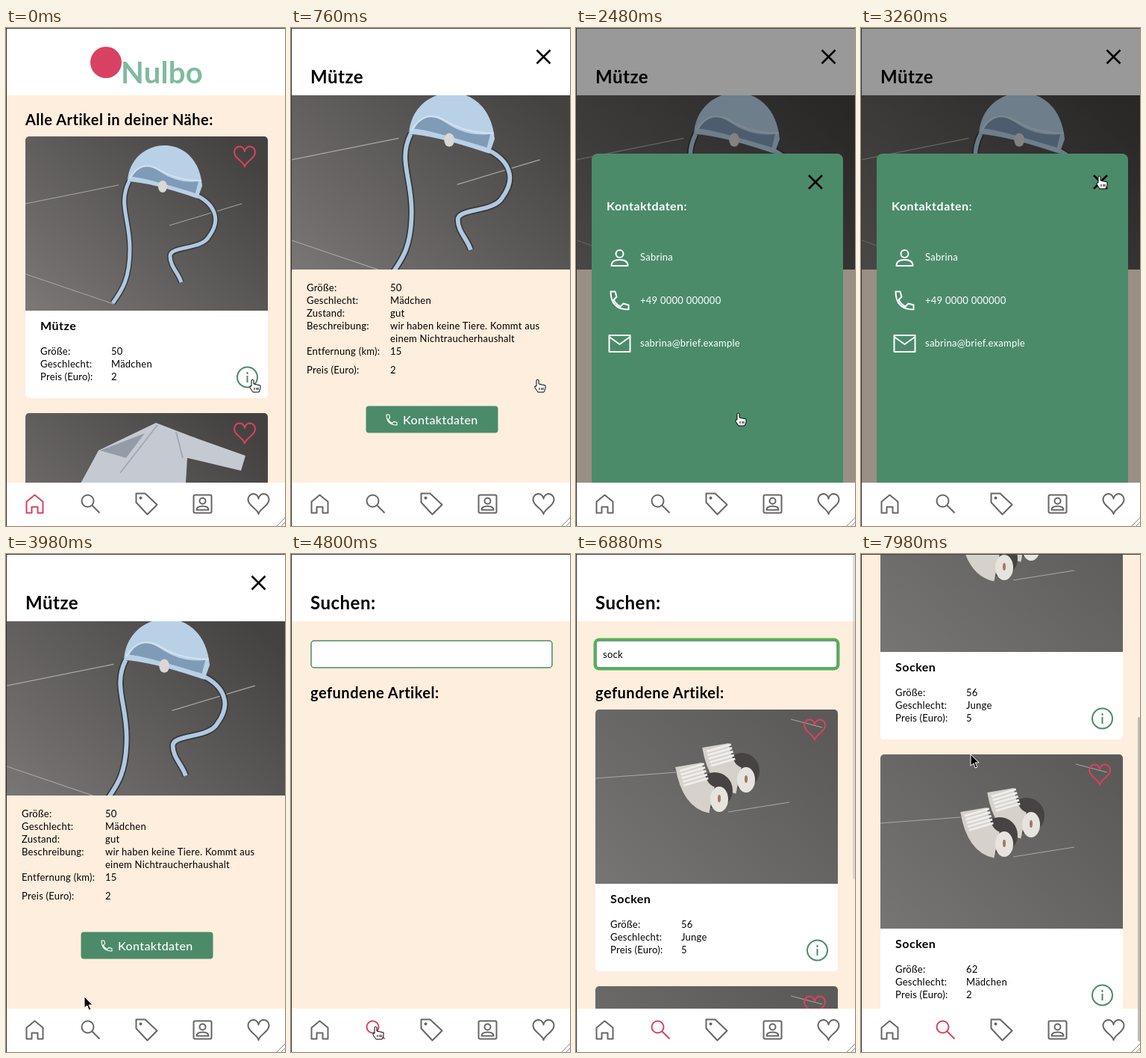
An HTML page for the animation above (8000 ms loop, 374x666 px).

```html
<!DOCTYPE html>
<html lang="de">
<head>
<meta charset="utf-8">
<title>Kinderartikel</title>
<style>
  html, body { margin: 0; width: 100%; height: 100%; overflow: hidden; background: #fff; }
  svg { display: block; }
  text { font: 13px Lato, "Open Sans", sans-serif; letter-spacing: .25px; }
  .h1, .h2, .h3 { font-weight: 700; letter-spacing: .5px; }
  .h1 { font-size: 24px; }
  .h2 { font-size: 20px; }
  .h3 { font-size: 16px; }
  .button { font-size: 16px; font-weight: 500; letter-spacing: .4px; }
  .brand { font-size: 40px; font-weight: 700; }
  .print { font-size: 6px; }
  .line { fill: none; stroke: #666; stroke-width: 2; stroke-linejoin: round; }
  .active { stroke: #d94162; }
  .green { stroke: #4b8b69; }
  .white { stroke: #fff; }
  .black { stroke: #000; stroke-width: 2.5; }
</style>
</head>
<body>
<svg id="stage" width="374" height="666" viewBox="0 0 374 666"></svg>
<script>
const LOOP = 8000, WIDTH = 374, HEIGHT = 666, HEADER = 90, NAV = 608;
const MARGIN = 26, CARD_STEP = 370, ROW = 17;
const PEACH = '#feeedd', GREEN = '#4b8b69', PINK = '#d94162';
const stage = document.getElementById('stage');

const text = (x, y, s, cls = '', fill = '#000') => `<text x="${x}" y="${y}" class="${cls}" fill="${fill}">${s}</text>`;
const rect = (x, y, w, h, fill, extra = '') => `<rect x="${x}" y="${y}" width="${w}" height="${h}" fill="${fill}" ${extra}/>`;
const path = (d, fill, extra = '') => `<path d="${d}" fill="${fill}" ${extra}/>`;
const stroke = (d, color, width = 1, extra = '') => path(d, 'none', `stroke="${color}" stroke-width="${width}" ${extra}`);
const ellipse = (x, y, rx, ry, fill) => `<ellipse cx="${x}" cy="${y}" rx="${rx}" ry="${ry}" fill="${fill}"/>`;
const at = (x, y, content) => `<g transform="translate(${x} ${y})">${content}</g>`;
const group = (id, content) => `<g id="${id}">${content}</g>`;
const icon = (name, x, y, cls = '', scale = 1) =>
  `<g class="line ${cls}" transform="translate(${x} ${y}) scale(${scale})">${icons[name]}</g>`;

function heartOutline(size) {
  const points = Array.from({ length: 48 }, (_, i) => {
    const a = i / 48 * 2 * Math.PI;
    const y = 13 * Math.cos(a) - 5 * Math.cos(2 * a) - 2 * Math.cos(3 * a) - Math.cos(4 * a);
    return [size * Math.sin(a) ** 3, -(y + 2.5) * size / 15];
  });
  return `<polygon points="${points.join(' ')}"/>`;
}

const icons = {
  home: '<path d="M-11-3L0-12 11-3V12H4V4H-4V12H-11Z"/>',
  search: '<circle cx="-4" cy="-4" r="8"/><path d="M2 2L12 12"/>',
  tag: '<path d="M-14-14H-2L14 1 1 14-14-2Z"/><circle cx="-8" cy="-8" r="1"/>',
  account: '<rect x="-12" y="-12" width="24" height="24" rx="2"/><circle cy="-4" r="4"/><path d="M-8 8Q-8 3 0 3T8 8Z"/>',
  heart: heartOutline(14),
  info: '<circle r="13.5"/><path d="M0-2V7M0-7V-4"/>',
  close: '<path d="M-9-9L9 9M9-9L-9 9"/>',
  person: '<circle cy="-5" r="5"/><path d="M-11 11Q-11 3 0 3T11 11Z"/>',
  phone: '<path d="M-12-12H-6L-4-5-8-1Q-5 5 1 8L5 4 12 6V12Q-12 12-12-12Z"/>',
  mail: '<path d="M-14-11H14V11H-14ZM-14-9L0 1 14-9"/>'
};

// Photos are drawn in a 325 x 233 box on a stone table.
const table = (shade, scratches) => rect(0, 0, 325, 233, `url(#${shade})`) + stroke(scratches, '#aaa8a6');
const ribbon = d => stroke(d, '#38383a', 8) + stroke(d, '#b0c9e0', 5);
const sock = ellipse(160, 108, 24, 24, '#464342') +
  stroke('M125 74Q132 116 156 121', '#d6d1cb', 36) +
  stroke('M129 76L136 100', '#efeeec', 34, 'stroke-dasharray="3 2"') +
  ellipse(166, 120, 12, 17, '#e7e3de') + ellipse(166, 119, 2, 5, '#a17766');

const photos = {
  hat: table('dark', 'M0 90L125 65M0 184L118 224M193 119L290 90') +
    ribbon('M139 60C124 90 140 110 140 150S130 205 117 223') +
    ribbon('M230 79C252 90 264 110 246 134 236 152 194 146 194 160S205 182 209 195') +
    path('M137 60C140 0 230-10 237 66L231 83Q170 62 137 60Z', '#b9d1e7') +
    path('M143 54Q155 30 180 47T232 60L228 76Q160 55 143 54Z', '#809bb7') +
    stroke('M140 56Q155 30 180 45T236 59', '#d2e1ef', 2) +
    ellipse(184, 67, 6, 8, '#d9d8d6'),
  shirt: table('dark', '') +
    path('M68 105L98 50 175 13 222 31 295 57 289 77 217 60 214 110Z', '#c5cad2') +
    path('M100 50L160 27 135 60Z', '#969ca7') +
    stroke('M177 16L127 80M202 25L211 60', '#a2a8b3', 2),
  romper: table('light', 'M0 119Q75 112 100 84M12 130Q5 180 16 232M244 102Q280 80 325 82') +
    stroke('M158 130Q195 170 203 222M205 90Q250 110 265 162', '#183f4d', 27) +
    path('M72 49L132 10 210 28 216 82 134 146 97 97Z', '#1b4656') +
    stroke('M100 40Q95 70 134 144', '#0f303e', 3) +
    ellipse(132, 64, 11, 9, '#d9ddd5') + ellipse(142, 80, 15, 13, '#9fb9ac') +
    `<g transform="translate(145 112) rotate(-25)">${text(0, 0, 'klein &amp; fein', 'print', '#d5e1e1')}</g>`,
  socks: table('mid', 'M0 92L108 84M178 137L260 124M262 13L304 24') + at(36, -26, sock) + sock
};

const photo = (name, x, y, w, h) =>
  `<svg x="${x}" y="${y}" width="${w}" height="${h}" viewBox="0 0 325 233" preserveAspectRatio="xMidYMid slice">${photos[name]}</svg>`;

const facts = (x, valueX, y, rows) => rows.map(([label, value], i) =>
  text(x, y + i * ROW, label) + text(valueX, y + i * ROW, value)).join('');

const card = (y, name, title, size, gender, price) => at(MARGIN, y, `<g clip-path="url(#card)">` +
  rect(0, 0, 325, 350, '#fff') + photo(name, 0, 0, 325, 233) +
  icon('heart', 294, 27, 'active') + text(20, 259, title, 'h3') +
  facts(20, 115, 292, [['Größe:', size], ['Geschlecht:', gender], ['Preis (Euro):', price]]) +
  icon('info', 297.5, 322, 'green') + '</g>');

const background = rect(0, HEADER, WIDTH, 2 * HEIGHT, PEACH);

const homePage = background +
  ellipse(134, 46, 21, 21, PINK) + text(154, 74, 'Nulbo', 'brand', '#7fbb9f') +
  text(MARGIN, 130, 'Alle Artikel in deiner Nähe:', 'h2') +
  card(145, 'hat', 'Mütze', 50, 'Mädchen', 2) +
  card(145 + CARD_STEP, 'shirt', 'Wickelbody', 56, 'Mädchen', 3);

const detailPage = background +
  text(MARGIN, 74, 'Mütze', 'h1') + icon('close', 338.5, 38.5, 'black') + photo('hat', 1, HEADER, 373, 233) +
  facts(21, 133, 352, [
    ['Größe:', '50'], ['Geschlecht:', 'Mädchen'], ['Zustand:', 'gut'],
    ['Beschreibung:', 'wir haben keine Tiere. Kommt aus'], ['', 'einem Nichtraucherhaushalt'],
    ['Entfernung (km):', '15']
  ]) +
  facts(21, 133, 462, [['Preis (Euro):', '2']]) +
  rect(100.5, 505.5, 177, 36, GREEN, 'rx="4"') + icon('phone', 135, 524, 'white', .58) +
  text(150, 530, 'Kontaktdaten', 'button', '#fff');

const searchPage = background + text(MARGIN, 74, 'Suchen:', 'h1') +
  rect(25, 114, 327, 40, 'none', 'id="focusRing" rx="6" stroke="#53b350" stroke-width="3"') +
  rect(27, 116, 323, 36, '#fff', `rx="4" stroke="${GREEN}" stroke-width="1.5"`) +
  group('query', text(36, 139, '')) + rect(0, 126, 1, 17, '#000', 'id="caret"') +
  text(MARGIN, 193, 'gefundene Artikel:', 'h2') +
  group('results',
    group('romper', card(208, 'romper', 'Strampler', 56, 'Junge', 20)) +
    group('socks', card(208, 'socks', 'Socken', 56, 'Junge', 5)) +
    card(208 + CARD_STEP, 'socks', 'Socken', 62, 'Mädchen', 2));

const contacts = [['person', 'Sabrina'], ['phone', '+49 0000 000000'], ['mail', 'sabrina@brief.example']];
const sheet = rect(21, 168, 337, 500, GREEN, 'rx="8"') + icon('close', 321, 206, 'black') +
  text(41, 244, 'Kontaktdaten:', 'h3', '#fff') +
  contacts.map(([name, value], i) =>
    at(58.5, 307 + i * 57.5, icon(name, 0, 0, 'white') + text(27.5, 4, value, '', '#fff'))).join('');

const gradient = (id, from, to) =>
  `<linearGradient id="${id}" x1="0" y1="1" x2="1" y2=".2"><stop stop-color="${from}"/><stop offset="1" stop-color="${to}"/></linearGradient>`;
const tabs = ['home', 'search', 'tag', 'account', 'heart'];
const pages = ['home', 'detail', 'search'];

stage.innerHTML = '<defs>' +
  gradient('dark', '#7b7877', '#444241') + gradient('mid', '#777574', '#5c5a59') + gradient('light', '#918e8d', '#676462') +
  '<clipPath id="card"><rect width="325" height="350" rx="5"/></clipPath></defs>' +
  group('home', homePage) + group('detail', detailPage) + group('search', searchPage) +
  rect(1, 1, WIDTH, HEIGHT, '#000', 'id="backdrop"') + group('sheet', sheet) +
  rect(0, NAV, WIDTH, HEIGHT - NAV, '#fff') +
  tabs.map((name, i) => group('tab-' + name, icon(name, 38.5 + i * 75, 636.5))).join('') +
  rect(371, 1, 4, 0, '#bbb', 'id="thumb" rx="2"') +
  stroke('M363 666L374 655M369 666L374 661', '#888') +
  rect(0, 0, WIDTH, 1, '#444') + rect(0, 0, 1, HEIGHT, '#333') +
  group('cursor',
    group('arrow', path('M0 0V15L4 12 6 18 9 17 6 11H11Z', '#000', 'stroke="#fff"')) +
    group('hand', path('M-1 9V1Q0-1 2 1V6L11 8V12L9 17H1L-3 11Q-4 8-1 9Z', '#fff', 'stroke="#000" stroke-linejoin="round"') +
      stroke('M3 11V14M6 11V14M8 11V14', '#000')));

const el = Object.fromEntries([...stage.querySelectorAll('[id]')].map(n => [n.id, n]));
const show = (id, on) => el[id].style.display = on ? '' : 'none';
const progress = (t, from, to) => Math.max(0, Math.min(1, (t - from) / (to - from)));
const smooth = p => p * p * (3 - 2 * p);
const easeOut = p => 1 - (1 - p) ** 3;

const TYPING = 5780, KEY_GAP = 190, FOCUS = 5420, CURSOR_BACK = 7050, TRAVEL = 500;

// Each stop is reached at its arrival time after a fixed travel time.
const stops = [
  { arrival: 0, x: 330, y: 470, link: true },
  { arrival: 1500, x: 217, y: 515, link: true },
  { arrival: 3050, x: 319, y: 198, link: true },
  { arrival: 3960, x: 105, y: 592 },
  { arrival: 4480, x: 113, y: 632, link: true },
  { arrival: 5400, x: 147, y: 130 },
  { arrival: 7400, x: 147, y: 268 }
];

function drawCursor(t) {
  let { x, y } = stops[0];
  for (const { arrival, x: nextX, y: nextY } of stops) {
    const p = smooth(progress(t, arrival - TRAVEL, arrival));
    x += (nextX - x) * p;
    y += (nextY - y) * p;
  }
  const hand = stops.some(s => s.link && Math.hypot(s.x - x, s.y - y) < 22);
  el.cursor.setAttribute('transform', `translate(${x} ${y})`);
  show('hand', hand);
  show('arrow', !hand);
  show('cursor', t < TYPING || t > CURSOR_BACK);
}

function drawSearch(t) {
  const typed = Math.max(0, Math.min(4, 1 + Math.floor((t - TYPING) / KEY_GAP)));
  const label = el.query.firstChild;
  label.textContent = 'sock'.slice(0, typed);
  const lastKey = typed ? TYPING + (typed - 1) * KEY_GAP : FOCUS;
  el.caret.setAttribute('x', 36 + (typed ? label.getComputedTextLength() : 0));
  show('caret', t >= FOCUS && (t - lastKey) % 1000 < 500);
  show('focusRing', t >= FOCUS);
  show('results', typed);
  show('romper', typed === 1);
  show('socks', typed > 1);

  const scroll = easeOut(progress(t, 7440, 7940));
  el.search.setAttribute('transform', `translate(0 ${-310 * scroll})`);
  el.thumb.setAttribute('y', 1 + 217 * scroll);
  el.thumb.setAttribute('height', typed === 1 ? 244 : 434);
  el.thumb.setAttribute('opacity', scroll ? 1 : 1 - progress(t, 6760, 7000));
  show('thumb', typed);
}

function draw(t) {
  const page = t < 400 ? 'home' : t < 4500 ? 'detail' : 'search';
  for (const id of pages) show(id, id === page);
  for (const name of tabs) el['tab-' + name].firstChild.classList.toggle('active', name === page);

  const open = easeOut(progress(t, 1920, 2380)) * (1 - smooth(progress(t, 3360, 3640)));
  el.backdrop.setAttribute('opacity', .4 * open);
  el.sheet.setAttribute('transform', `translate(0 ${(1 - open) * (NAV - 158)})`);
  show('sheet', open > 0);

  drawSearch(t);
  drawCursor(t);
}

function tick() {
  draw(performance.now() % LOOP);
  requestAnimationFrame(tick);
}
tick();
</script>
</body>
</html>
```
